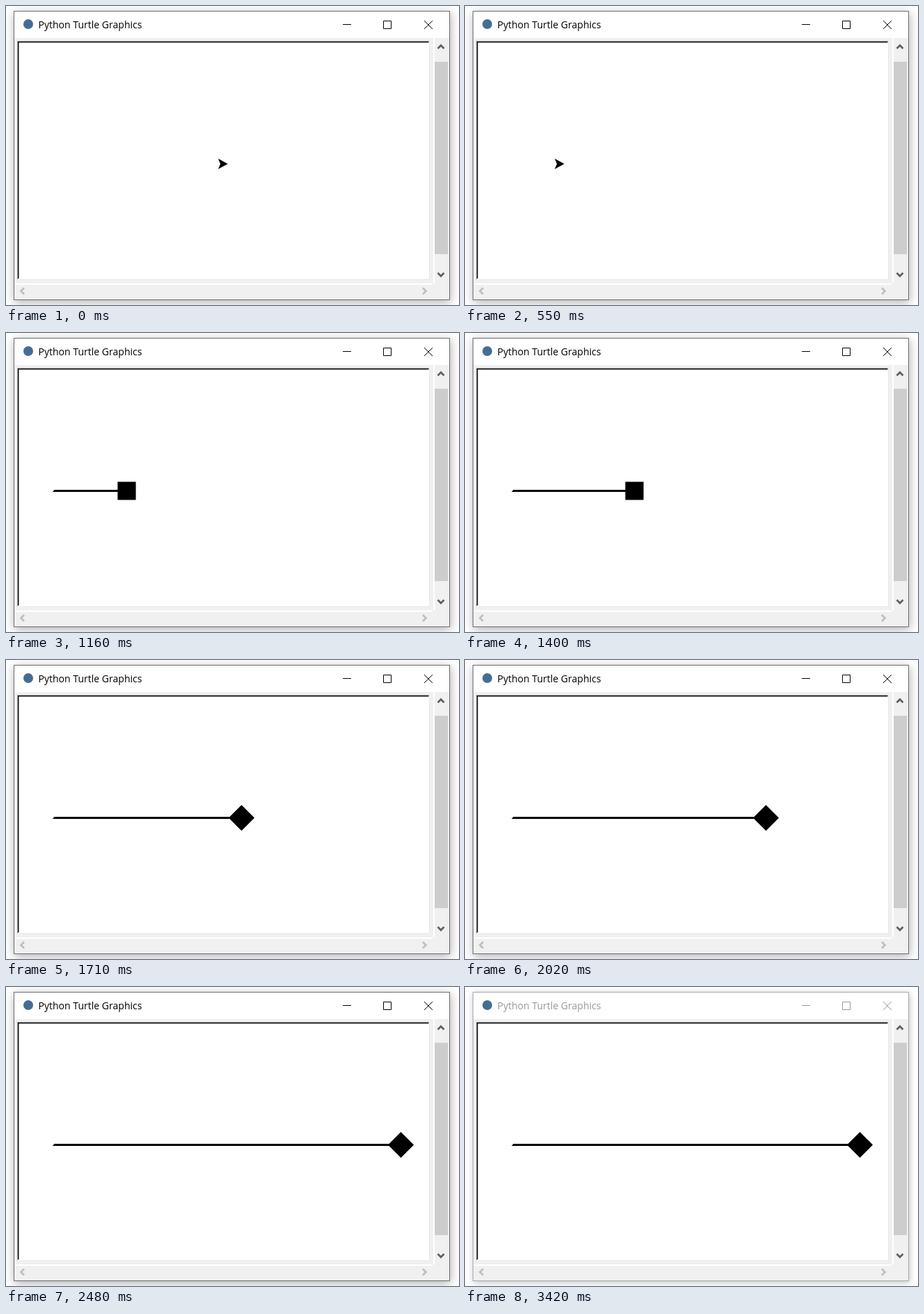
Write an HTML page that moves like this. It is 651x429 px and loops after 3.57 s.

```html
<!DOCTYPE html>
<html lang="en">
<head>
<meta charset="utf-8">
<title>Turtle window</title>
<style>
  html, body { margin: 0; width: 100%; height: 100%; overflow: hidden; background: #fff; }
  #stage {
    --ink: #000; --edge: #6e6e6e; --shadow: 1px 3px 13px rgba(0, 0, 0, .32);
    position: relative; width: 100%; height: 100%; overflow: hidden;
  }
  #stage.inactive {
    --ink: #999; --edge: #aaa; --shadow: 1px 2px 9px rgba(0, 0, 0, .25);
  }
  #window {
    position: absolute; left: 11px; top: 7px; width: 625px; height: 413px;
    border: 1px solid var(--edge); background: #f0f0f0; box-shadow: var(--shadow);
  }
  svg { position: absolute; left: 0; top: 0; width: 100%; height: 100%; }
  text { font: 14.05px "Open Sans", "Noto Sans", sans-serif; fill: var(--ink); }
  .buttons { fill: none; stroke: var(--ink); }
  .chevron { fill: none; stroke: #606060; stroke-width: 2.7; }
  .disabled { stroke: #bfbfbf; }
  #turtle { stroke: #000; stroke-width: 1.2; }
</style>
</head>
<body>
<div id="stage">
  <div id="window"></div>
  <svg viewBox="0 0 651 429">
    <path fill="#fff" d="M12 8H637V46H12Z"/>
    <circle cx="32" cy="26" r="7" fill="#456d94"/>
    <text x="46.5" y="32">Python Turtle Graphics</text>
    <g class="buttons">
      <path d="M484 26.5H496M542.5 21.5H553.5V32.5H542.5Z"/>
      <path d="M601 21L613 33M613 21L601 33"/>
    </g>

    <path fill="#a0a0a0" d="M16 50H608V392H16Z"/>
    <path fill="#e8e8e8" d="M608 50V392H16V393H609V50Z"/>
    <path fill="#111" d="M17 51H607V391H17Z"/>
    <path fill="#fff" d="M18.5 52.5H608V392H17V391H18.5Z"/>

    <path fill="#fff" d="M614 46H616V398H614ZM12 398H613V400H12Z"/>
    <path fill="#cdcdcd" d="M616 80H635V356H616Z"/>
    <path class="chevron" d="M620.5 61L625 56.5L629.5 61M620.5 383L625 387.5L629.5 383"/>
    <path class="chevron disabled" d="M26 404.5L21.5 409L26 413.5M599 404.5L603.5 409L599 413.5"/>

    <path id="trail"/>
    <path id="turtle"/>
  </svg>
</div>

<script>
const LOOP = 3570, INACTIVE_AT = 3420, MID_Y = 226.5;

const SHAPES = {
  arrow: "M0 0L-11.4 -6.25L-8.75 0L-11.4 6.25Z",
  square: "M-12.5 -12.5H12.5V12.5H-12.5Z",
  diamond: "M0 -17.7L17.7 0L0 17.7L-17.7 0Z",
};

// Evenly stepped moves: shape, first time, last time, steps, first x, last x.
const RUNS = [
  ["arrow", 0, 0, 1, 317.5, 317.5],
  ["arrow", 90, 550, 7, 283, 141.5],
  ["arrow", 630, 780, 3, 118, 71],
  ["square", 860, 1090, 4, 75, 145],
  ["square", 1160, 1160, 1, 173.5, 173.5],
  ["square", 1250, 1400, 3, 196.5, 243.5],
  ["square", 1480, 1560, 2, 267, 290.5],
  ["square", 1680, 1680, 1, 317.5, 317.5],
  ["diamond", 1710, 2020, 5, 338.5, 432.5],
  ["diamond", 2100, 2170, 2, 455, 478],
  ["diamond", 2250, 2480, 4, 500, 567.5],
];

const poses = RUNS.flatMap(([shape, t0, t1, steps, x0, x1]) =>
  Array.from({ length: steps }, (_, i) => {
    const k = steps > 1 ? i / (steps - 1) : 0;
    return { shape, time: Math.floor(t0 + (t1 - t0) * k), x: x0 + (x1 - x0) * k };
  }));

const [stage, trail, turtle] = ["stage", "trail", "turtle"].map(id => document.getElementById(id));

function draw(now) {
  const time = now % LOOP;
  const { shape, x } = poses.findLast(pose => pose.time <= time);
  turtle.setAttribute("d", SHAPES[shape]);
  turtle.setAttribute("transform", `translate(${x} ${MID_Y})`);
  trail.setAttribute("d", shape === "arrow" ? "" : `M67 228L69.5 225H${x}V228Z`);
  stage.classList.toggle("inactive", time >= INACTIVE_AT);
}

const start = performance.now();
function tick() {
  draw(performance.now() - start);
  requestAnimationFrame(tick);
}
tick();
</script>
</body>
</html>
```
